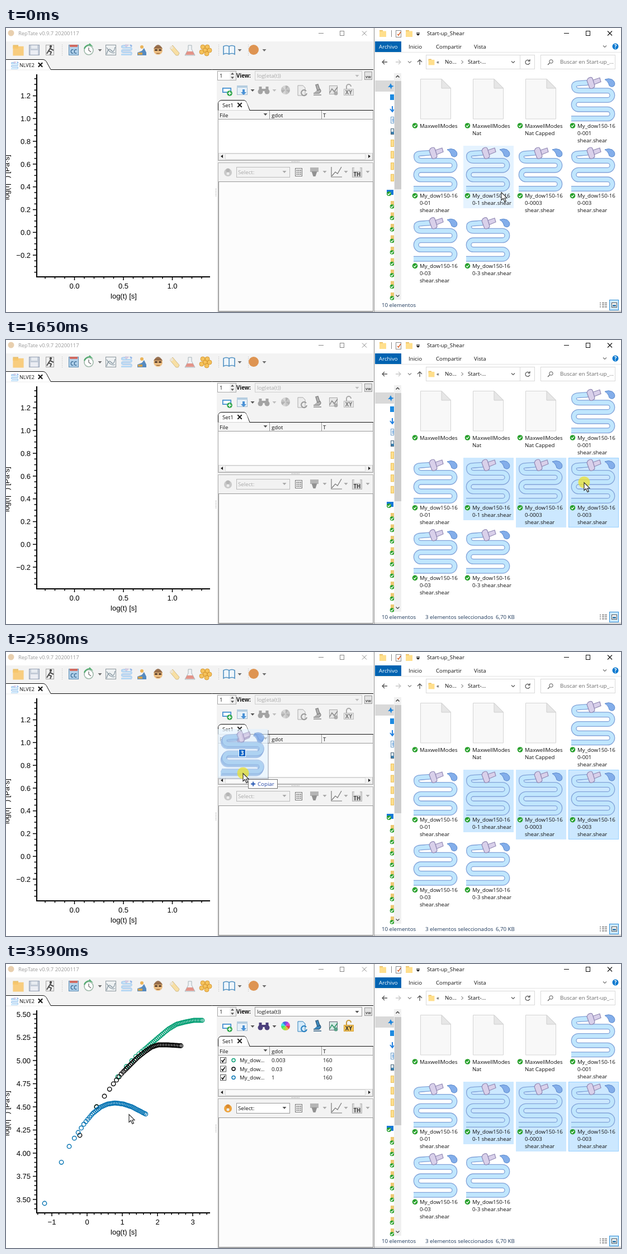
An HTML page with a canvas that plays this animation: 1100 by 509 pixels, repeating every 3980 ms.

```html
<!DOCTYPE html>
<html lang="es">
<head>
<meta charset="utf-8">
<title>Drag and drop</title>
<style>
html, body { margin: 0; width: 100%; height: 100%; overflow: hidden; background: #fff; }
canvas { display: block; }
</style>
</head>
<body>
<canvas id="stage" width="1100" height="509"></canvas>
<script>
const ctx = document.getElementById('stage').getContext('2d');
const LOOP = 3980, SELECT_ONE = 90, SELECT_ALL = 870, DRAG = 1880, DROP = 3450, TABLE = 3520, PLOT = 3590;
const UI = '9.7px "Open Sans", sans-serif', BOLD = 'bold 9.7px "Open Sans", sans-serif';
const AXIS = '13px "Liberation Sans", Arial, sans-serif';
const INK = '#111', STATUS = '#1e395b', BLUE = '#2f7fd0', GOLD = '#ffdf8c';

// Pointer stops: time, x, y
const POINTER = [
  [0, 886, 294], [320, 893, 291], [400, 915, 283], [470, 945, 273], [550, 980, 265], [630, 1014, 259],
  [700, 1029, 257], [780, 1034, 256], [1100, 1033, 257], [1340, 1032, 258], [1410, 1033, 258], [1560, 1034, 255],
  [1880, 1012, 251], [1960, 958, 245], [2040, 888, 238], [2120, 809, 229], [2190, 739, 219], [2270, 667, 208],
  [2350, 599, 200], [2430, 535, 203], [2510, 477, 210], [2580, 424, 217], [2660, 382, 225], [2740, 347, 233],
  [2820, 318, 240], [2890, 295, 246], [2960, 255, 259], [3040, 234, 266], [3120, 220, 269]
];

function box(x, y, w, h, fill, stroke) {
  if (fill) { ctx.fillStyle = fill; ctx.fillRect(x, y, w, h); }
  if (stroke) { ctx.strokeStyle = stroke; ctx.lineWidth = 1; ctx.strokeRect(x + .5, y + .5, w - 1, h - 1); }
}
function label(text, x, y, color = INK, font = UI, align = 'left') {
  ctx.font = font; ctx.fillStyle = color; ctx.textAlign = align;
  ctx.fillText(text, x, y);
}
function dot(x, y, r, fill, stroke, width = 1) {
  ctx.beginPath(); ctx.arc(x, y, r, 0, 7);
  if (fill) { ctx.fillStyle = fill; ctx.fill(); }
  if (stroke) { ctx.strokeStyle = stroke; ctx.lineWidth = width; ctx.stroke(); }
}
// SVG path drawn relative to (x, y)
function shape(d, x, y, fill, stroke, width = 1) {
  const path = new Path2D(d);
  ctx.save(); ctx.translate(x, y);
  if (fill) { ctx.fillStyle = fill; ctx.fill(path); }
  if (stroke) { ctx.strokeStyle = stroke; ctx.lineWidth = width; ctx.stroke(path); }
  ctx.restore();
}
const arrow = (x, y, color = '#555') => shape('M-3.5-2H3.5L0 2Z', x, y, color);
const chevron = (x, y, color = '#555') => shape('M-3-1.5L0 1.5L3-1.5', x, y, null, color, 1.2);
const cross = (x, y, r, color, width) => shape(`M${-r} ${-r}L${r} ${r}M${r} ${-r}L${-r} ${r}`, x, y, null, color, width);
const folder = (x, y, s = 1, color = GOLD) => {
  box(x - 6 * s, y - 6 * s, 6 * s, 4 * s, '#e8b95a');
  box(x - 6 * s, y - 4.5 * s, 12 * s, 10.5 * s, color);
};
const badge = (x, y, r = 4.8) => {
  dot(x, y, r, '#28a02c');
  shape('M-2.4 0L-.6 2L2.5-1.8', x, y, null, '#fff', 1.3);
};

const HOSE = 'M32 10C20 13 5 9 5 17Q5 25 14 25H65A8.33 8.33 0 0 1 65 41.67H13A8.33 8.33 0 0 0 13 58.33H65A8.33 8.33 0 0 1 65 75H0';
function hose(x, y, scale = 1) {
  ctx.save(); ctx.translate(x, y); ctx.scale(scale, scale);
  shape(HOSE, 0, 0, null, '#82a3d9', 10);
  shape(HOSE, 0, 0, null, '#c0e6fd', 7.4);
  shape('M39 6L51 2L53 9L41 14Z', 0, 0, '#d9d0ea', '#9189b4', 1.2);
  shape('M30 3Q36-1 38 3L42 16Q42 20 37 21Q33 22 32 18L28 7Z', 0, 0, '#d9d0ea', '#9189b4', 1.2);
  shape('M60 5Q67 2 73 5Q80 10 77 16Q73 20 68 16Q66 8 60 5Z', 0, 0, '#83aeea', '#5a88cc', 1);
  ctx.restore();
}

// Explorer entries in reading order
const FILES = [
  ['MaxwellModes'], ['MaxwellModes', 'Nat'], ['MaxwellModes', 'Nat Capped'],
  ...['001', '01', '1 shear.shear', '0003', '003', '03', '3 shear.shear'].map(n =>
    ['My_dow150-16', '0-' + n].concat(n.includes(' ') ? [] : 'shear.shear'))
];
const entryBox = i => {
  const lines = FILES[i].length;
  return [818 - 94 + 94 * (i % 4), 85 + Math.floor(i / 4) * 125.7, 90, lines < 3 ? 112 : 125];
};

function entries(t, px, py) {
  FILES.forEach((lines, i) => {
    const [x, y, w, h] = entryBox(i);
    const hover = t < SELECT_ALL && px >= x && px < x + w && py >= y && py < y + h;
    const selected = (i === 5 && t >= SELECT_ONE) || (t >= SELECT_ALL && i > 4 && i < 8);
    const focus = t >= SELECT_ALL ? i === 7 : selected;
    const top = Math.round(y);
    if (selected) box(x, top, w, h, '#cce8ff', focus ? '#99d1ff' : null);
    else if (hover) box(x, top, w, h, '#e5f3ff');
    if (i < 3) {
      shape('M.5.5H38L54.5 17V72H.5Z', x + 17, y + 6, '#f8f8f8', '#d4d4d4');
      shape('M38 .5V17H54.5Z', x + 17, y + 6, '#e6e6e6', '#cfcfcf');
    } else hose(x + 5, y + 2.3);
    badge(x + 7.5, y + 90);
    lines.forEach((line, n) => label(line, x + 16, y + 93.5 + n * 13));
  });
}

function explorer(t, px, py) {
  box(658, 0, 442, 509, '#fff');
  folder(674, 10); box(689, 4, 1, 12, '#888');
  box(697, 4, 10, 13, '#fff', '#8a8a8a');
  shape('M-2 0L0 2L4-4', 702, 11, null, '#d9622b', 1.5);
  folder(721, 10); box(734, 8, 6, 1, '#333'); arrow(737, 12, '#222');
  label('Start-up_Shear', 753, 13);
  box(998, 9, 9, 1, '#111'); box(1037, 5, 8, 9, null, '#111'); cross(1080, 9.5, 4, '#111', 1.1);
  box(660, 24, 47, 19, '#0063b1'); label('Archivo', 667, 37, '#fff');
  label('Inicio', 720, 37); label('Compartir', 769, 37); label('Vista', 837, 37);
  chevron(1071, 33, '#777'); dot(1090, 33, 5.5, '#0878cf'); label('?', 1090, 36.5, '#fff', BOLD, 'center');
  box(660, 43, 440, 1, '#e3e3e3');
  shape('M5 0H-4M0-4L-4 0L0 4', 677, 61, null, '#555', 1.3);
  shape('M-5 0H4M0-4L4 0L0 4', 702, 61, null, '#c8c8c8', 1.3);
  chevron(722, 61, '#888');
  shape('M0 5V-4M-4 0L0-4L4 0', 740, 61, null, '#555', 1.3);
  box(751, 48, 195, 26, '#fff', '#d9d9d9'); box(919, 48, 1, 26, '#d9d9d9');
  folder(761, 61, .9); label('«', 770, 64); label('No...', 785, 64);
  shape('M-1.5-3L1.5 0L-1.5 3', 816, 61, null, '#555'); label('Start-...', 826, 64);
  chevron(907, 61);
  shape('M3.3-2A4 4 0 1 0 4 1M4-5V-1.5H.5', 933, 61, null, '#555', 1.2);
  box(956, 48, 134, 26, '#fff', '#d9d9d9');
  dot(975, 60, 3.2, null, '#555'); shape('M0 0L-3.5 3.5', 972.5, 62.5, null, '#555', 1.2);
  label('Buscar en Start-up_...', 991, 64, '#6b6b6b');

  // Navigation pane
  box(660, 94, 34, 20, '#d9d9d9');
  shape('M0-5L2-1L6 0L2 2L1 6L-1 2L-5 2L-2-1Z', 688, 104, '#1f86dc');
  box(687, 119, 7, 10, '#1d8ae0');
  shape('M0-5V4M-4 0L0 5L4 0', 691, 145, null, '#1f7fe0', 2);
  box(688, 159, 6, 12, '#fff', '#6a9cc9'); box(690, 163, 4, 1, BLUE); box(690, 166, 4, 1, BLUE);
  box(688, 180, 6, 11, '#dceefb', '#4d6478'); box(689, 186, 5, 4, '#3b7fae');
  for (let i = 0; i < 4; i++) box(688, 200 + i * 20.6, 6, 13, GOLD, '#eac05d');
  box(681, 290, 12, 9, '#1678d8'); badge(685, 297, 4);
  for (let i = 0; i < 9; i++) { box(688, 310 + i * 20.5, 6, 13, '#edc872'); badge(690.5, 320 + i * 20.5, 3.8); }
  box(694, 81, 13, 406, '#f0f0f0'); box(695, 95, 12, 194, '#cdcdcd');
  shape('M-3 1.5L0-1.5L3 1.5', 700.5, 87, null, '#444', 1.5); chevron(700.5, 480, '#444');

  entries(t, px, py);

  label('10 elementos', 672, 500, STATUS);
  if (t >= SELECT_ALL) {
    label('3 elementos seleccionados', 750, 500, STATUS); label('6,70 KB', 876, 500, STATUS);
  } else if (t >= SELECT_ONE) {
    label('1 elemento seleccionado', 750, 500, STATUS); label('2,11 KB', 867, 500, STATUS);
  }
  for (let i = 0; i < 3; i++) for (const x of [1062, 1066, 1071]) box(x, 492 + i * 3.5, x < 1066 ? 2 : 4, 1.5, '#777');
  box(1079, 487, 17, 19, '#cce8ff', '#2a8dd4'); box(1083, 492, 10, 9, '#fff', '#555'); box(1085, 496, 6, 3, '#3b7fae');
  box(658, 0, 1, 509, '#8a8a8a'); box(659, 507, 441, 1, '#aaa');
}

function mainToolbar() {
  box(0, 24, 657, 33, '#f3f3f3');
  ctx.save(); ctx.globalAlpha = .85;
  folder(22, 40, 1.6, '#f9c76c');
  box(41, 30, 19, 19, '#bcc6d4', '#8f9bb0'); box(45, 31, 11, 6, '#eef1f5'); box(44, 40, 13, 8, '#f2f4f8');
  box(71, 30, 15, 19, '#efefef', '#999');
  dot(80, 33, 2.2, '#333'); shape('M1-3L-3 3L2 5L0 10M-3 3L-6 8M0-1L6 2', 79, 38, null, '#333', 2);
  for (const x of [100, 380, 433]) for (let y = 30; y < 50; y += 3) box(x, y, 1, 1, '#aaa');
  box(112, 30, 18, 19, '#a9cdea', '#4a7fa8'); box(114, 30, 14, 4, '#d95b4c');
  label('CC', 121, 46, '#2c5f8c', BOLD, 'center');
  dot(148, 40, 8, '#fff', '#8fae9c', 1.6); shape('M0-5V0L4 3', 148, 40, null, '#555', 1.3);
  shape('M-8-3A9 9 0 0 1 4-9L1-12', 148, 40, null, '#38a05a', 2);
  arrow(168, 40);
  box(178, 30, 19, 19, '#eef1f2', '#7c8890'); shape('M2 16Q5 3 10 9T17 3M2 4Q9 16 17 13', 178, 31, null, '#738591', 1.3);
  hose(206, 29, .25);
  dot(243, 34, 3, '#e7a83f'); shape('M-8 9V4L0 1L4-4L8 4V9Z', 243, 40, '#3977b5'); box(236, 44, 8, 4, '#e8a63c');
  dot(272, 40, 8, '#e9b36c'); shape('M-8-2Q0-16 8-2Z', 272, 39, '#8a5f3e');
  box(266, 38, 5, 3, '#493123'); box(273, 38, 5, 3, '#493123'); box(269, 45, 6, 1, '#794323');
  shape('M-8-4L-3-9L9 5L7 9L3 9Z', 301, 40, '#f8db94', '#c9b380'); dot(296, 35, 3, '#ece6dc');
  shape('M-3-9H3V-2L9 9H-9L-3-2Z', 329, 40, '#eef2f4', '#9aa8ae'); shape('M-5 2H5L8 8H-8Z', 329, 40, '#e28376');
  for (const [x, y] of [[352, 34], [360, 34], [356, 40], [364, 40], [350, 43], [359, 46]]) dot(x, y, 4, '#f5b840', '#d0922f');
  shape('M0-6Q-5-9-10-6V8Q-5 5 0 8Q5 5 10 8V-6Q5-9 0-6V8', 399, 39, '#edf6fc', '#347fb8', 1.6);
  arrow(418, 40);
  dot(443, 39, 9, '#d98335');
  arrow(462, 40);
  ctx.restore();
}

function dataPanel(on) {
  const tint = (color, gray = '#bdbdbd') => on ? color : gray;
  const text = tint(INK, '#a9a9a9');
  box(377, 76, 280, 433, '#f3f3f3');
  box(378, 77, 34, 17, '#fff', '#aaa'); box(400, 78, 11, 15, '#f0f0f0'); label('1', 382, 89);
  shape('M-3 1.5H3L0-2Z', 405, 82, '#555'); shape('M-3-1.5H3L0 2Z', 405, 89, '#555');
  label('View:', 412, 89, '#111', BOLD);
  box(445, 77, 192, 17, tint('#fff', '#f2f2f2'), tint('#999', '#cfcfcf')); label('log(eta(t))', 449, 89, text);
  arrow(628, 86, tint('#555'));
  box(641, 78, 14, 15, '#e3e3e3', '#999'); label('vw', 648, 90, '#555', 'bold 7px "Open Sans", sans-serif', 'center');

  box(387, 107, 16, 9, '#fff', '#3683c6'); box(388, 108, 14, 7, null, '#77b4e5');
  dot(400, 117, 4.8, '#2fa64a'); shape('M-3 0H3M0-3V3', 400, 117, null, '#fff', 1.6);
  box(413, 103, 19, 17, '#e6f0f8', '#a3bace'); box(413, 103, 19, 4, '#b5cde0');
  shape('M-2-5H2V0H5L0 5L-5 0H-2Z', 425, 115, '#4a91d5'); arrow(441, 112);
  const lens = tint('#4c407c', '#a3a3a3');
  for (const x of [455, 467]) { dot(x, 114, 4.5, lens); box(x - 2.5, 105, 5, 8, lens); }
  box(457, 109, 8, 4, lens); arrow(480, 112, tint('#555'));
  for (let i = 0; i < 8; i++) {
    ctx.beginPath(); ctx.moveTo(500, 111); ctx.arc(500, 111, 8, i * Math.PI / 4, (i + 1) * Math.PI / 4);
    ctx.fillStyle = on ? `hsl(${i * 45} 75% 58%)` : `hsl(0 0% ${70 + i % 3 * 7}%)`; ctx.fill();
  }
  shape('M0 0H9L13 4V18H0Z', 522, 103, tint('#d4eafa', '#ececec'), tint('#3181bb', '#aaa'));
  shape('M4-3A5 5 0 1 0 5 1', 533, 116, null, tint('#267fc0', '#999'), 2);
  shape('M-3-9L1-10L4-1L0 1ZM3-3Q9 2 3 6H-7M-7 9H7', 557, 111, tint('#3f8dc2', '#b5b5b5'), tint('#315f82', '#888'), 1.5);
  box(578, 103, 15, 16, tint('#d6eae5', '#e6e6e6'), tint('#667', '#aaa'));
  shape('M0 11L4 4L8 9L14 1', 579, 105, null, tint('#289063', '#888'), 1.5);
  dot(590, 117, 3.5, tint('#5a9f86', '#aaa'));
  shape('M-4 0V-4A4 4 0 0 1 4-4', 613, 109, null, tint('#ca9a38', '#aaa'), 2);
  box(604, 109, 18, 12, tint('#f5c456', '#e6e6e6'), tint('#d6a23b', '#bbb'));
  label('XY', 613, 119, tint('#333', '#777'), BOLD, 'center');

  // Data set table
  box(379, 147, 278, 91, '#fff', '#aaa');
  shape('M.5 18V5Q2 0 7 0H47Q50 0 52 6L57 18H278', 379, 129.5, null, '#111', 1);
  shape('M1 18V5Q2 1 7 1H47Q50 1 52 6L56 18Z', 379, 129.5, '#fff');
  label('Set1', 387, 142); cross(418, 138, 3.7, '#222', 2);
  box(380, 148, 276, 15, '#f6f6f6'); box(380, 163, 276, 1, '#999');
  box(471, 148, 1, 15, '#999'); box(564, 148, 1, 15, '#999');
  label('File', 382, 160); arrow(464, 155); label('gdot', 475, 160); label('T', 567, 160);
  if (on) [['0.003', '#009e73'], ['0.03', '#000'], ['1', '#0072b2']].forEach(([rate, color], i) => {
    const y = 172.5 + i * 15.5;
    box(383, y - 5.5, 11, 11, '#fff', '#555'); shape('M-3 0L-1 3L3-3', 388.5, y, null, '#111', 1.6);
    dot(407, y, 3, '#fff', color, 1.4);
    label('My_dow...', 418, y + 3.5); label(rate, 475, y + 3.5); label('160', 567, y + 3.5);
  });
  box(380, 224, 276, 13, '#f0f0f0', '#d0d0d0'); box(392, 225, 251, 11, '#f9f9f9', '#ddd');
  shape('M2-3L-2 0L2 3Z', 386, 230, '#222'); shape('M-2-3L2 0L-2 3Z', 650, 230, '#222');
  for (let i = 0; i < 6; i++) { box(511 + i * 2.5, 239, 1, 1, '#888'); box(375, 288 + i * 2.5, 1, 1, '#888'); }

  // Theory area
  box(379, 241, 278, 268, null, '#b0b0b0');
  dot(397, 259, 7, tint('#eda33c', '#c9c9c9')); dot(397, 255, 3.5, tint('#d98a30', '#b5b5b5')); dot(397, 261, 2.5, '#eee');
  box(412, 249, 96, 19, tint('#fff', '#f2f2f2'), tint('#999', '#bbb')); label('Select:', 415, 262, text);
  arrow(498, 258, tint('#555', '#aaa'));
  box(517, 251, 13, 15, '#f4f4f4', '#777');
  for (let i = 0; i < 9; i++) box(519.5 + i % 3 * 3.2, 254 + Math.floor(i / 3) * 3.5, 2, 2, '#777');
  box(544, 250, 15, 8, '#b5b5b5'); shape('M-5 0H5L2 9H-2Z', 551.5, 257, '#929292'); arrow(570, 258, '#aaa');
  shape('M0 0V18H19M1 16L7 9L11 12L18 0', 582, 249, null, '#777', 1.2); arrow(608, 258, '#aaa');
  box(619, 250, 18, 18, '#d6d6d6', '#b5b5b5'); box(623, 250, 10, 6, '#f2f2f2');
  label('TH', 628, 266, '#444', BOLD, 'center'); arrow(647, 258, '#aaa');
  box(380, 275, 277, 233, '#fcfcfc', '#999');
}

const SERIES = [
  ['#009e73', 3, [162,256, 200,202, 215,184, 232,166, 250,151, 271,133, 290,117, 305,108, 320,104, 335,101, 351,101]],
  ['#000', 2, [132,307, 162,256, 176,237, 192,215, 207,196, 235,168, 250,156, 260,149, 272,145, 290,145, 313,146.5]],
  ['#0072b2', 2, [69,429, 100,353, 113,327, 123,311, 140,286, 155,268, 170,256, 182,251, 195,249, 210,251, 225,256, 250,269]]
];
function curveY(p, x) {
  let i = 0;
  while (i < p.length - 4 && x > p[i + 2]) i += 2;
  return p[i + 1] + (p[i + 3] - p[i + 1]) * (x - p[i]) / (p[i + 2] - p[i]);
}
// Samples evenly spaced in time, thinned once they crowd on the log axis
function series([color, step, points]) {
  const start = points[0], end = points[points.length - 2];
  for (let k = 1, x = start; x <= end;) {
    dot(x, curveY(points, x), 3.7, null, color, 1.4);
    k = Math.max(k + step, k * 10 ** (2.5 / 63));
    x = start + 63 * Math.log10(k);
  }
}

function ticks(first, gap, count, parts, low, high, format, vertical) {
  for (let i = -parts; i < (count + 1) * parts; i++) {
    const p = first + i * gap / parts, major = i % parts === 0;
    if (p < low || p > high) continue;
    const length = major ? 6 : 3.5, at = p - .75;
    if (vertical) box(54 - length, at, length, 1.5, '#000');
    else box(at, 446, 1.5, length, '#000');
    if (!major) continue;
    const text = format(i / parts).replace('-', '−');
    if (vertical) label(text, 44, p + 4.7, '#000', AXIS, 'right');
    else label(text, p, 467, '#000', AXIS, 'center');
  }
}
function plot(on) {
  box(0, 76, 377, 433, '#fff');
  box(54, 83, 2, 364, '#000'); box(54, 445, 311, 2, '#000');
  if (on) {
    ticks(90, 41.5, 9, 5, 83, 446, i => (5.5 - i * .25).toFixed(2), true);
    ticks(82, 63, 5, 5, 55, 365, i => String(i - 1), false);
    SERIES.forEach(series);
  } else {
    ticks(121.5, 40.8, 8, 4, 83, 446, i => (1.2 - i * .2).toFixed(1).replace('-0.0', '0.0'), true);
    ticks(122.5, 87.5, 3, 5, 55, 365, i => (i * .5).toFixed(1), false);
  }
  label('log(t) [s]', 210.5, 485, '#000', AXIS, 'center');
  ctx.save(); ctx.translate(6, 308); ctx.rotate(-Math.PI / 2);
  label('log(η', 0, 0, '#000', AXIS); label('+', 32, -5, '#000', '9px "Liberation Sans", sans-serif');
  label(') [Pa·s]', 39, 0, '#000', AXIS);
  ctx.restore();
}

function application(t) {
  box(0, 0, 659, 509, '#fff');
  dot(9, 9, 5.5, '#e8cfae');
  label('RepTate v0.9.7 20200117', 22, 13, '#999', '9.4px "Open Sans", sans-serif');
  box(559, 9, 9, 1, '#888'); box(597, 5, 8, 9, null, '#888'); cross(641, 9.5, 4, '#888', 1);
  mainToolbar();
  box(0, 57, 657, 19, '#f3f3f3');
  shape('M0 0H66Q71 0 74 7L80 18H0Z', 0, 56.5, '#fff');
  shape('M0 0H66Q71 0 74 7L80 18H657', 0, 56.5, null, '#111', 1);
  hose(9, 60, .17); label('NLVE2', 24, 70, INK, '9px "Open Sans", sans-serif'); cross(61.5, 66, 3.7, '#111', 2);
  plot(t >= PLOT);
  dataPanel(t >= TABLE);
}

function dragGhost(x, y) {
  const left = x - 45, top = y - 79;
  box(left + 89, top + 2, 2, 88, 'rgba(60,80,110,.3)');
  box(left + 2, top + 88, 87, 2, 'rgba(60,80,110,.3)');
  box(left, top, 89, 88, 'rgba(226,242,253,.65)');
  ctx.save(); ctx.globalAlpha = .6;
  for (const i of [0, 1, 2]) hose(x - 40 + i, y - 72 - i * 2, .97);
  ctx.restore();
  box(x - 8, y - 43, 13, 14, '#0b63c5', '#fff');
  label('3', x - 1.5, y - 32.5, '#fff', BOLD, 'center');
}
function copyHint(x, y) {
  box(x + 9, y + 11, 53, 17, '#fff', '#767676');
  shape('M-4 0H4M0-4V4', x + 18, y + 19.5, null, '#1c50b0', 1.8);
  label('Copiar', x + 26, y + 23, '#2445a5');
}

function draw(t) {
  const [, x, y] = POINTER.filter(stop => stop[0] <= t).pop();
  const dragging = t >= DRAG && t < DROP;
  const pressed = (t >= 90 && t < 170) || (t >= 870 && t < 1020) || (t >= 1560 && t < DROP);
  application(t);
  explorer(t, x, y);
  if (dragging) dragGhost(x, y);
  if (pressed) dot(x, y, 10.5, 'rgba(236,226,48,.75)');
  if (dragging && x < 650) copyHint(x, y);
  shape('M0 0V14L3.3 11L6 17L8.4 16L5.8 10.2H10Z', x, y + .5, '#fff', '#222', 1.1);
}

function tick(now) {
  draw(now % LOOP);
  requestAnimationFrame(tick);
}
requestAnimationFrame(tick);
</script>
</body>
</html>
```
